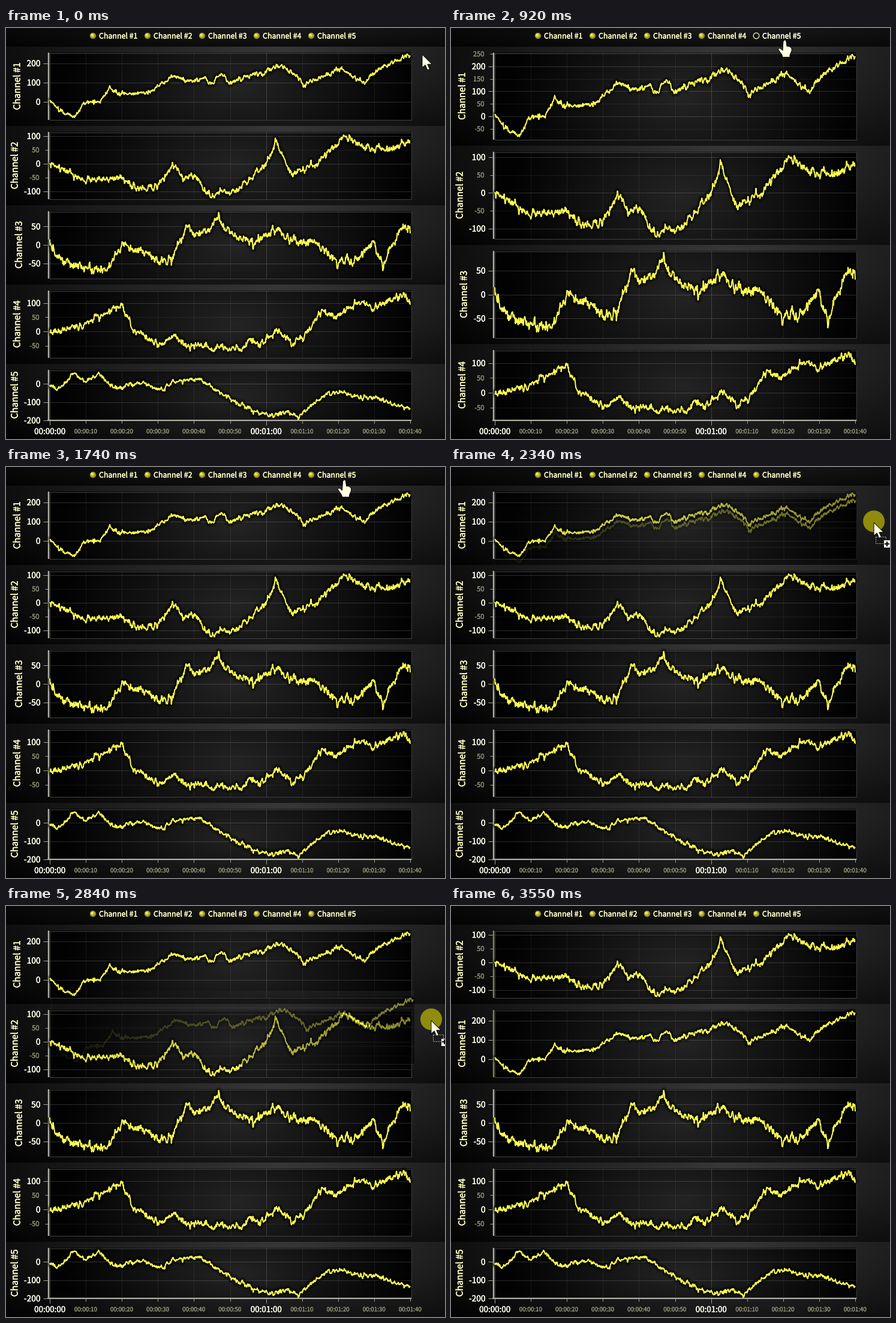
These frames come from a looping animation (732x684 px, 4050 ms). A matplotlib script:

```python
import numpy as np
import matplotlib.pyplot as plt
from matplotlib import patheffects
from matplotlib.animation import FuncAnimation
from matplotlib.patches import Circle, Polygon, Rectangle

W, H = 732, 684
LOOP, STEP = 4050, 25
X0, PX_PER_S = 73, 6.01
TOP = 31
YELLOW, HOVER = "#ffff50", "#ffffa0"
CREAM, TICK, MINOR = "#ffffc4", "#fffff0", "#8c8c74"

plt.rcParams["font.family"] = "Noto Sans CJK JP"
plt.rcParams["path.simplify"] = False

# Value range, title x, tick steps and the turning points (second, value).
CHANNELS = {
    1: dict(lo=-94, hi=255, title_x=19, major=100, minor=50, minor_min_h=120,
            turns=[(0, 5), (3.5, -53), (7, -76), (9.5, -5), (14, 5), (16.5, 72), (19, 42),
                   (28, 54), (34.3, 138), (38, 104), (43, 122), (45, 84), (47.5, 148),
                   (49.5, 98), (65, 190), (71, 92), (80.7, 178), (87, 90), (91, 170),
                   (100, 245)]),
    2: dict(lo=-129, hi=115, title_x=15, major=100, minor=50, minor_min_h=0,
            turns=[(0, 2), (9.5, -60), (20, -50), (23, -85), (30, -82), (34, -5),
                   (37, -50), (41, -45), (43.5, -112), (52, -95), (60, 0), (62.9, 80),
                   (67, -42), (75, 10), (81.5, 100), (88, 54), (95, 52), (100, 82)]),
    3: dict(lo=-91, hi=91, title_x=22, major=50, minor=0, minor_min_h=0,
            turns=[(0, 15), (2, -36), (13, -72), (17, -58), (20.5, 6), (29, -40),
                   (33.8, -40), (38, 50), (41, 18), (47, 72), (50, 25), (57, 6),
                   (63, 42), (68, 4), (73, 14), (80, -45), (85, -40), (89.5, 8),
                   (92.3, -54), (98, 48), (100, 40)]),
    4: dict(lo=-93, hi=144, title_x=19, major=100, minor=50, minor_min_h=0,
            turns=[(0, -4), (10, 25), (20, 94), (23, 5), (30, -50), (34, -18), (38, -42),
                   (53, -66), (55.5, -23), (58, -52), (63.5, 8), (67, -42), (71, -14),
                   (75.5, 78), (78.5, 50), (87, 108), (90, 84), (98, 130), (100, 104)]),
    5: dict(lo=-200, hi=76, title_x=15, major=100, minor=0, minor_min_h=0,
            turns=[(0, -7), (2, -27), (7, 58), (10, 15), (13.5, 50), (18.5, -30),
                   (25, 8), (31, -32), (35, 20), (42, 20), (47, -50), (56, -140),
                   (62, -180), (66, -155), (69, -176), (77.5, -46), (92, -82),
                   (95, -118), (100, -133)]),
}

SECONDS = np.linspace(0, 100, 1000)


def make_series(ch):
    """Trend through the turning points plus short-memory noise."""
    c = CHANNELS[ch]
    trend = np.interp(SECONDS, *zip(*c["turns"]))
    kicks = np.random.default_rng(ch).normal(0, 5, SECONDS.size)
    wobble = np.zeros_like(kicks)
    for i in range(1, kicks.size):
        wobble[i] = 0.68 * wobble[i - 1] + kicks[i]
    return np.clip(trend + wobble, c["lo"] + 3, c["hi"] - 3)


SERIES = {ch: make_series(ch) for ch in CHANNELS}

fig = plt.figure(figsize=(W / 72, H / 72), dpi=72, facecolor="black")
backdrop = fig.figimage(np.zeros((H, W, 4), np.uint8), zorder=-1)
ax = fig.add_axes([0, 0, 1, 1])


def reset_axes():
    ax.cla()
    ax.set(xlim=(0, W), ylim=(H, 0))
    ax.axis("off")


def panels(count):
    """Top, bottom, plot top and plot bottom of each stacked panel."""
    step = 660 // count
    for i in range(count):
        top = TOP + i * step
        last = i == count - 1
        yield top, H if last else top + step, top + 10, 653 if last else top + step - 10


def shade(count):
    yy, xx = np.mgrid[0:H, 0:W].astype(float)
    side = (xx - 455) / 455
    grey = 26 - 18 * np.hypot(side, yy / TOP * 0.8)
    for top, bottom, p_top, p_bot in panels(count):
        rows = slice(top, bottom)
        down = (yy[rows] - top) / (bottom - top)
        grey[rows] = 56 - 44 * np.sqrt(0.9 * side[rows] ** 2 + 0.6 * down ** 2)
        plot = slice(p_top, p_bot), slice(72, 676)
        dx = (xx[plot] - 385) / 310
        dy = 2 * (yy[plot] - p_top) / (p_bot - p_top) - 1
        grey[plot] = 36 * (1 - np.sqrt(dx ** 2 + 0.12 * dy ** 2))
    img = np.full((H, W, 4), 255, np.uint8)
    img[..., :3] = np.clip(grey, 2, 255)[..., None]
    return img


def write(x, y, text, size, color, **kw):
    bold = patheffects.withStroke(linewidth=0.35, foreground=color)
    ax.text(x, y, text, fontsize=size, color=color, path_effects=[bold], **kw)


def label(x, y, text, size, color, ha="right"):
    write(x, y + 0.365 * size, text, size, color, ha=ha, va="baseline")


def rule(xs, ys, color, width=1.0, alpha=1.0):
    ax.plot(xs, ys, color=color, lw=width, alpha=alpha,
            solid_capstyle="butt", solid_joinstyle="round")


def draw_legend(dot, text_color):
    for ch in CHANNELS:
        x = 54 + 91 * ch
        if ch == 5 and dot == "off":
            ax.add_patch(Circle((x, 13), 4.8, fill=False, ec=CREAM, lw=1.2))
        elif ch == 5 and dot == "hover":
            ax.add_patch(Circle((x, 13), 5.2, fc=HOVER, ec="none"))
        else:
            for k in np.linspace(0, 1, 8):
                color = (0.5 + 0.48 * k, 0.5 + 0.48 * k, 0.1 + 0.3 * k)
                ax.add_patch(Circle((x - 1.6 * k, 13 - 1.6 * k), 5.2 - 4.2 * k,
                                    fc=color, ec="none"))
        label(x + 10, 13, f"Channel #{ch}", 12.4, text_color if ch == 5 else CREAM, "left")


def draw_panel(ch, p_top, p_bot, axis_color, line_color):
    c = CHANNELS[ch]
    height = p_bot - p_top

    def to_y(v):
        return p_top + (c["hi"] - v) / (c["hi"] - c["lo"]) * height

    for k in range(1, 10):
        x = X0 + 10 * PX_PER_S * k
        rule([x, x], [p_top, p_bot], "white", alpha=0.17 if k == 6 else 0.07)
    step = c["minor"] if c["minor"] and height > c["minor_min_h"] else c["major"]
    for v in range(-200, 251, step):
        if not c["lo"] <= v <= c["hi"]:
            continue
        y, big = to_y(v), v % c["major"] == 0
        rule([72, 675], [y, y], "white", alpha=0.16 if big else 0.06)
        rule([62 if big else 65, 70], [y, y], "#a0a098")
        if big:
            label(57.5, y, str(v), 13.8, TICK)
        else:
            label(55.5, y, str(v), 11.2, MINOR)
    ax.add_patch(Rectangle((72.5, p_top + 0.5), 603, height - 1,
                           fill=False, ec="#404040", lw=1))
    rule([70.5, 70.5], [p_top, p_bot], axis_color, 2.4)
    write(c["title_x"], (p_top + p_bot) / 2, f"Channel #{ch}", 15.2, CREAM,
          rotation=90, ha="center", va="center")
    xs, ys = X0 + PX_PER_S * SECONDS, to_y(SERIES[ch])
    for width, alpha in ((12, 0.14), (9, 0.2), (6, 0.3)):
        rule(xs, ys, "black", width, alpha)
    rule(xs, ys, line_color, 2)


def draw_time_axis():
    rule([69, 676], [653, 653], "#b0b0a8", 2.2)
    for k in range(11):
        x = X0 + 10 * PX_PER_S * k
        big = k % 6 == 0
        rule([x, x], [653, 661 if big else 658], "#a0a098")
        label(x, 671, f"00:{k // 6:02d}:{k % 6 * 10:02d}", 13.4 if big else 9.8,
              TICK if big else MINOR, "center")


def render(order, dot="on", text_color=CREAM, moved=()):
    reset_axes()
    backdrop.set_data(shade(len(order)))
    draw_legend(dot, text_color)
    for ch, (_, _, p_top, p_bot) in zip(order, panels(len(order))):
        draw_panel(ch, p_top, p_bot, "#84845c" if ch in moved else "#b0b0a8",
                   HOVER if ch == 5 and dot == "hover" else YELLOW)
    draw_time_axis()
    fig.canvas.draw()
    return np.array(fig.canvas.buffer_rgba())


ALL, FOUR = (1, 2, 3, 4, 5), (1, 2, 3, 4)
normal = render(ALL)
SCENES = [
    (0, normal),
    (520, render(ALL, "hover", "#ffffe8")),
    (920, render(FOUR, "off", "#ffffe8")),
    (1220, render(FOUR, "off", "#ffffd6")),
    (1320, render(FOUR, "off")),
    (1740, normal),
    (3350, render((2, 1, 3, 4, 5), moved=(1, 2))),
]

# Pointer stops (ms, x, y); it eases from one to the next.
STOPS = [(20, 694, 44), (620, 557, 20), (1690, 557, 20), (2040, 694, 47),
         (2240, 704, 83), (2640, 711, 143), (3040, 707, 238), (LOOP, 707, 238)]

ARROW = 1.38 * np.array([(0, 0), (0, 16), (3.7, 12.7), (6.4, 18.8), (9, 17.7),
                         (6.4, 11.8), (11.8, 11.8)])
HAND = np.array([(-3, 2), (-1, 0), (1.5, 0.4), (3, 10.5), (6, 10.3), (9.5, 12), (11, 14),
                 (11, 18), (8, 25), (8, 28.5), (-4, 28.5), (-5, 25), (-11.5, 15.5),
                 (-10, 13.5), (-7, 14.5), (-4, 17.5)])

reset_axes()
halo = ax.add_patch(Circle((0, 0), 18, fc="#d8d000", alpha=0.62, ec="none"))
drag_box = ax.add_patch(Rectangle((0, 0), 17, 11, fill=False, ec="#d0d0d0", lw=1,
                                  ls=(0, (1.5, 1.5))))
badge = ax.add_patch(Rectangle((0, 0), 12, 13, fc="white", ec="black", lw=0.8))
plus, = ax.plot([], [], color="black", lw=2, solid_capstyle="butt")
pointer = ax.add_patch(Polygon(ARROW, fc="#ffffe4", ec="black", lw=0.9, joinstyle="round"))


def pointer_at(t):
    """Eased position, advancing once every 100 ms."""
    phase = 20 if t < 1640 else 40
    t = max(20, (t - phase) // 100 * 100 + phase)
    for (t0, *a), (t1, *b) in zip(STOPS, STOPS[1:]):
        if t <= t1:
            s = (t - t0) / (t1 - t0)
            s = s * s * (3 - 2 * s)
            return [p + (q - p) * s for p, q in zip(a, b)]


def with_ghost(img, x, y):
    """Blend a copy of the dragged plot, fading away from the pointer."""
    dx, dy = round(x - 704), round((y - 83) * 1.02)
    piece = normal[TOP:154, :676, :3].astype(float)
    h, w = piece.shape[:2]
    yy, xx = np.mgrid[TOP + dy:TOP + dy + h, dx:dx + w]
    alpha = 0.52 * np.clip(1 - np.hypot(xx - x, yy - y) / 680, 0, 1)[..., None]
    out = img.copy()
    area = out[TOP + dy:TOP + dy + h, dx:dx + w, :3]
    area[:] = area * (1 - alpha) + piece * alpha
    return out


def update(i):
    t = i * STEP + 20
    img = [scene for start, scene in SCENES if start <= t][-1]
    x, y = pointer_at(t)
    dragging = 2340 <= t < 3350
    backdrop.set_data(with_ghost(img, x, y) if dragging else img)
    pointer.set_xy((HAND if 520 <= t < 1840 else ARROW) + (x, y))
    pointer.set_visible(t < 3550)
    halo.set_center((x, y - 2))
    halo.set_visible(2240 <= t < 3350)
    drag_box.set_xy((x + 2.5, y + 23.5))
    badge.set_xy((x + 16, y + 29))
    cx, cy = x + 22, y + 35.5
    plus.set_data([cx - 4, cx + 4, np.nan, cx, cx], [cy, cy, np.nan, cy - 4, cy + 4])
    for part in (drag_box, badge, plus):
        part.set_visible(dragging)
    return backdrop, halo, drag_box, badge, plus, pointer


anim = FuncAnimation(fig, update, frames=LOOP // STEP, interval=STEP,
                     repeat=True, repeat_delay=0, blit=False)
plt.show()
```
